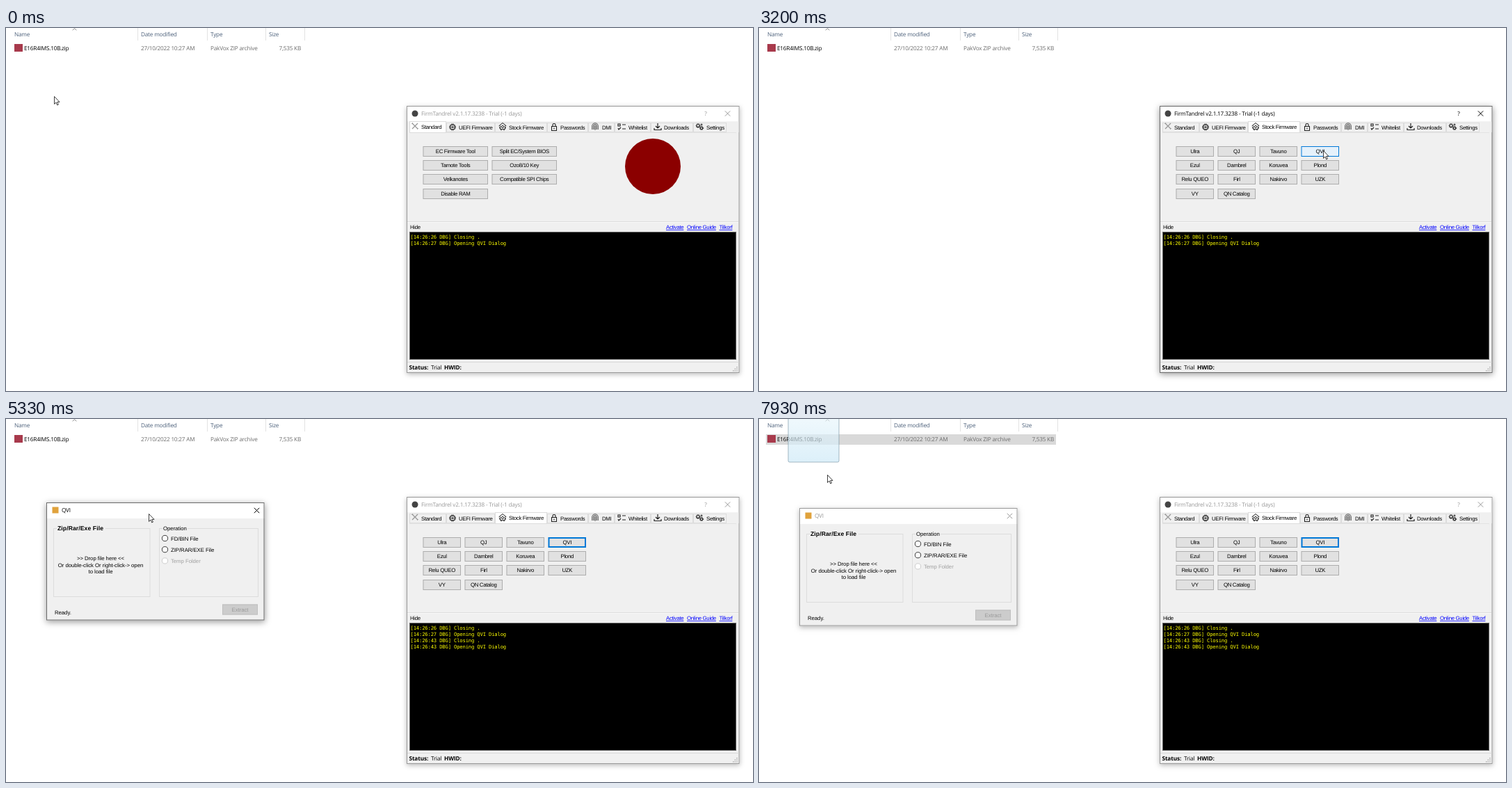
An HTML page with a canvas that plays this animation: 1074 by 522 pixels, repeating every 8000 ms.

```html
<!DOCTYPE html>
<html lang="en">
<head>
<meta charset="utf-8">
<title>Firmware tool demo</title>
<style>
html, body { margin: 0; width: 100%; height: 100%; overflow: hidden; background: #fff; }
canvas { display: block; }
</style>
</head>
<body>
<canvas id="stage" width="1074" height="522"></canvas>
<script>
const ctx = document.getElementById('stage').getContext('2d');
const LOOP = 8000, FPS = 15;

// font, letter spacing
const STYLES = {
  ui: ['8.2px "Open Sans", "Noto Sans", sans-serif', -0.2],
  uiBold: ['bold 8.2px "Open Sans", "Noto Sans", sans-serif', -0.1],
  app: ['7.8px "Liberation Sans", Arial, sans-serif', -0.3],
  dialog: ['7.8px "Liberation Sans", Arial, sans-serif', -0.06],
  dialogBold: ['bold 8.6px "Liberation Sans", Arial, sans-serif', 0.1],
  mono: ['7.2px "DejaVu Sans Mono", "Noto Sans Mono", monospace', -0.16],
};

// y is the vertical middle of the capitals
function text(str, x, y, style = 'app', color = '#000', align = 'left') {
  const [font, spacing] = STYLES[style];
  ctx.font = font;
  ctx.letterSpacing = spacing + 'px';
  ctx.textRendering = 'geometricPrecision';
  ctx.textAlign = align;
  ctx.fillStyle = color;
  ctx.fillText(str, x, y + 2.8);
}

function rect(x, y, w, h, fill, border, line = 1) {
  if (fill) { ctx.fillStyle = fill; ctx.fillRect(x, y, w, h); }
  if (border) {
    ctx.strokeStyle = border;
    ctx.lineWidth = line;
    ctx.strokeRect(x + line / 2, y + line / 2, w - line, h - line);
  }
}

function circle(x, y, r, fill, stroke, line = 1) {
  ctx.beginPath();
  ctx.arc(x, y, r, 0, 7);
  if (fill) { ctx.fillStyle = fill; ctx.fill(); }
  if (stroke) { ctx.strokeStyle = stroke; ctx.lineWidth = line; ctx.stroke(); }
}

function strokePath(d, x, y, color = '#222', line = 1) {
  ctx.save();
  ctx.translate(x, y);
  ctx.strokeStyle = color;
  ctx.lineWidth = line;
  ctx.stroke(new Path2D(d));
  ctx.restore();
}

function windowFrame(x, y, w, h, titleHeight, active) {
  ctx.save();
  ctx.shadowColor = `rgba(0,0,0,${active ? 0.4 : 0.28})`;
  ctx.shadowBlur = active ? 9 : 7;
  ctx.shadowOffsetY = 2;
  rect(x, y, w, h, '#f0f0f0');
  ctx.restore();
  rect(x, y, w, titleHeight, '#fff');
  rect(x, y, w, h, null, active ? '#6b6b6b' : '#9a9a9a');
}

const titleColor = active => active ? '#000' : '#999';
const closeMark = (x, y, active) => strokePath('M-3.7-3.7L3.7 3.7M3.7-3.7L-3.7 3.7', x, y, titleColor(active));

function button(label, x, y, w, fill = '#e1e1e1', border = '#adadad', line = 1) {
  rect(x, y, w, 15, fill, border, line);
  text(label, x + w / 2, y + 7.6, 'app', '#000', 'center');
}

// piecewise linear track of [time, ...values]
function track(keys, t) {
  let i = keys.findIndex(k => k[0] > t);
  if (i < 0) return keys[keys.length - 1].slice(1);
  if (i === 0) return keys[0].slice(1);
  const a = keys[i - 1], b = keys[i], p = (t - a[0]) / (b[0] - a[0]);
  return a.slice(1).map((v, n) => v + (b[n + 1] - v) * p);
}

const POINTER = [
  [400, 69, 98], [600, 170, 84], [870, 530, 92], [1070, 715, 128], [1200, 750, 139],
  [1930, 750, 139], [2200, 812, 168], [2530, 811, 176], [3470, 811, 176],
  [3600, 808, 175], [3870, 808, 175], [4070, 620, 160], [4330, 350, 110],
  [4600, 225, 65], [4870, 204, 45], [5000, 205, 47], [5070, 205, 66],
  [5130, 205, 98], [5200, 205, 118], [5330, 205, 136], [5530, 205, 142],
  [5730, 205, 142], [6000, 125, 82], [6200, 87, 34], [6270, 84, 26],
  [6530, 217, 25], [6670, 224, 25], [7070, 224, 25], [7470, 112, 28],
  [7730, 76, 38], [7870, 80, 62], [7930, 98, 80],
];
const DIALOG = [
  [5000, 55, 29], [5070, 57, 41], [5130, 57, 77], [5200, 57.5, 100],
  [5330, 58, 120], [5400, 58, 125], [5530, 58, 128],
];

function drawExplorer(t) {
  [189, 289, 373, 429].forEach(x => rect(x, 0, 1, 18, '#e3e3e3'));
  [['Name', 12], ['Date modified', 194], ['Type', 294], ['Size', 378]]
    .forEach(([label, x]) => text(label, x, 9, 'ui', '#4c607a'));
  strokePath('M-2.8 2.8L0 0L2.8 2.8', 98.5, 0.5, '#777', 0.8);

  const rowColor = t >= 7400 ? '#d9d9d9' : t >= 7070 ? '#cce8ff' : t >= 6200 ? '#e5f3ff' : null;
  if (rowColor) rect(10, 22, 417, 15, rowColor);
  rect(12, 23, 12, 11, '#a83a4c');
  text('E16R4IMS.10B.zip', 26, 29, 'ui');
  text('27/10/2022 10:27 AM', 194, 29, 'ui', '#6d6d6d');
  text('PakVox ZIP archive', 294, 29, 'ui', '#6d6d6d');
  text('7,535 KB', 424, 29, 'ui', '#6d6d6d', 'right');
}

function gear(x, y, r) {
  circle(x, y, r, null, '#222', 1.2);
  ctx.save();
  ctx.setLineDash([1, 1.2]);
  circle(x, y, r + 1, null, '#222', 1);
  ctx.restore();
}

const ICONS = [
  () => {
    strokePath('M-4-4L4 4M4-4L-4 4', 588, 141, '#999', 1.3);
    strokePath('M-5-3L-3-5M3 5L5 3', 588, 141, '#aaa');
  },
  () => {
    strokePath('M-3-3H3V3H-3ZM-1-5V-3M1-5V-3M-1 3V5M1 3V5M-5-1H-3M-5 1H-3M3-1H5M3 1H5', 642, 142.5, '#222', 1.1);
    rect(640.5, 141.5, 3, 2, '#222');
  },
  () => {
    strokePath('M-5.5-.5L0-5L5.5-.5M-3.5-1V4H3.5V-1M-5 2H-3.5M3.5 2H5M-2 4V6M2 4V6', 714, 141.5, '#222');
    circle(714, 142, 1.6, null, '#222');
  },
  () => {
    strokePath('M-3.5-1H3.5V5H-3.5ZM-2-1V-3.5Q-2-5 0-5Q2-5 2-3.5V-1M0 1V3', 788, 142.5, '#222', 1.1);
  },
  () => {
    [1.2, 2.8, 4.4].forEach(r =>
      strokePath(`M${-r} 4V-1A${r} ${r} 0 0 1 ${r}-1V4`, 847, 142, '#555', 0.9));
    strokePath('M0-1V5', 847, 142, '#555', 0.8);
  },
  () => {
    strokePath('M-5-4H-2V-1H-5ZM-5 2L-4 4L-1 1M1-3H6M1 3H6', 885, 142, '#222', 1.2);
  },
  () => {
    strokePath('M0-5V2M-3-1L0 2L3-1M-5 2V4.5H5V2', 937, 142, '#222', 1.2);
  },
  () => { gear(995, 140.5, 2); gear(1000, 144, 1.7); circle(1000, 139, 1, null, '#222'); },
];
const TABS = [
  ['Standard', 597], ['UEFI Firmware', 651], ['Stock Firmware', 723], ['Passwords', 797],
  ['DMI', 857], ['Whitelist', 895], ['Downloads', 946], ['Settings', 1007],
];
const TAB_EDGES = [580, 633, 703, 778, 837, 875, 927, 988, 1036];
const TOOLS = [
  ['EC Firmware Tool', 'Split EC/System BIOS'], ['Tarnote Tools', 'Ozo8/10 Key'],
  ['Velkanotes', 'Compatible SPI Chips'], ['Disable RAM'],
];
const VENDORS = [
  ['Ulra', 'QJ', 'Tavuno', 'QVI'], ['Ezul', 'Dambrel', 'Koruvea', 'Plond'],
  ['Relu QUEO', 'Firl', 'Nakirvo', 'UZK'], ['VY', 'QN Catalog'],
];
const LINKS = [['Activate', 949], ['Online Guide', 979], ['Tilkorf', 1025.5]];
const LOG = [
  '[14:26:26 DBG] Closing .', '[14:26:27 DBG] Opening QVI Dialog',
  '[14:26:43 DBG] Closing .', '[14:26:43 DBG] Opening QVI Dialog',
];

function drawTabs(t, selected) {
  TABS.forEach(([label, x], i) => {
    const left = TAB_EDGES[i], width = TAB_EDGES[i + 1] - left, current = i === selected;
    if (current) rect(left, 134, width, 17, '#fff', '#dcdcdc');
    else {
      const hovered = i === 2 && t >= 1130;
      rect(left, 136, width, 14, hovered ? '#d8eaf9' : '#f0f0f0', '#dcdcdc');
    }
    ICONS[i]();
    text(label, x, current ? 141.7 : 142.7);
  });
}

function vendorState(t) {
  if (t >= 4000) return ['#e1e1e1', '#0078d7', 2];
  if (t >= 3470 && t < 3600) return ['#cce4f7', '#005499'];
  if (t >= 2330) return ['#e5f1fb', '#0078d7'];
  return [];
}

function drawMain(t) {
  const stock = t >= 1470, active = stock && t < 3730;
  windowFrame(576, 112, 478.5, 384, 22.5, active);
  circle(588, 123, 4.5, '#444');
  text('FirmTandrel v2.1.17.3238 - Trial (-1 days)', 597, 123, 'ui', titleColor(active));
  text('?', 1006, 123, 'ui', titleColor(active), 'center');
  closeMark(1037.5, 123, active);

  rect(577, 134.5, 476.5, 15.5, '#f0f0f0');
  rect(580, 150, 470, 1, '#e3e3e3');
  drawTabs(t, stock ? 2 : 0);
  rect(577, 278, 476, 1, '#dcdcdc');
  rect(577, 279, 476, 1, '#fafafa');

  const grid = stock ? VENDORS : TOOLS, [width, pitch] = stock ? [54.5, 60] : [93.5, 99];
  grid.forEach((row, r) => row.forEach((label, c) => {
    const state = label === 'QVI' ? vendorState(t) : [];
    button(label, 599.5 + c * pitch, Math.floor(170 + r * 20.34), width, ...state);
  }));
  if (!stock) circle(930, 199, 40, '#8b0000');

  text('Hide', 581, 286);
  LINKS.forEach(([label, x]) => {
    text(label, x, 286, 'app', '#00f');
    rect(x, 290, ctx.measureText(label).width, 0.8, '#00f');
  });

  rect(580, 293, 470, 184, '#000', '#646464');
  LOG.slice(0, t >= 3670 ? 4 : 2).forEach((line, i) => text(line, 581.5, 300 + i * 9, 'mono', '#ff0'));

  rect(577, 480, 476.5, 1, '#dadada');
  text('Status:', 579.5, 488.5, 'uiBold');
  text('Trial', 611, 488.5, 'ui');
  text('HWID:', 630, 488.5, 'uiBold');
  for (let r = 0; r < 3; r++)
    for (let c = 2 - r; c < 3; c++) rect(1045 + c * 2.6, 487 + r * 2.6, 1.4, 1.4, '#aaa');
}

function groupBox(x, w, label, style, labelWidth) {
  rect(x, 37, w, 99, null, '#dcdcdc');
  rect(x + 5, 35, labelWidth, 5, '#f0f0f0');
  text(label, x + 6, 37, style);
}

function drawDialog(t) {
  if (t < 3730) return;
  const [x, y] = track(DIALOG, t), active = t >= 3870 && t < 7070;
  const [scale, veil] = track([[3730, 0.96, 0.6], [3800, 0.987, 0.35], [3870, 1, 0]], t);
  const W = 313.5, H = 169.5;
  ctx.save();
  ctx.translate(x + W / 2, y + H / 2);
  ctx.scale(scale, scale);
  ctx.translate(-W / 2, -H / 2);

  windowFrame(0, 0, W, H, 23, active);
  rect(8.5, 6.5, 9, 9, '#e0a23c');
  text('QVI', 22, 11.5, 'ui', titleColor(active || t < 3870));
  closeMark(302.5, 11.5, active || t < 3870);

  groupBox(10, 139.5, 'Zip/Rar/Exe File', 'dialogBold', 70);
  groupBox(162, 143, 'Operation', 'dialog', 36);
  ['>> Drop file here <<', 'Or double-click Or right-click-> open', 'to load file']
    .forEach((line, i) => text(line, 78, 80.5 + i * 9.2, 'dialog', '#000', 'center'));
  ['FD/BIN File', 'ZIP/RAR/EXE File', 'Temp Folder'].forEach((label, i) => {
    const cy = 51.5 + i * 16.2, off = i === 2;
    circle(170.5, cy, 4.1, '#fff', off ? '#ccc' : '#333');
    text(label, 179, cy + 0.3, 'dialog', off ? '#a0a0a0' : '#000');
  });
  text('Ready.', 12, 158.5, 'dialog');
  rect(253, 146.5, 51, 15, '#ccc', '#bfbfbf');
  text('Extract', 278.5, 154, 'dialog', '#9a9a9a', 'center');

  // fade in over the white desktop
  rect(0, 0, W, H, `rgba(255,255,255,${veil})`);
  ctx.restore();
}

function drawDragImage(t, px, py) {
  if (t < 7400) return;
  const x = px - 56, bottom = py - 18, top = bottom - 77;
  const fill = ctx.createLinearGradient(0, top, 0, bottom);
  fill.addColorStop(0, 'rgba(235,247,252,.6)');
  fill.addColorStop(1, 'rgba(205,233,247,.7)');
  ctx.beginPath();
  ctx.roundRect(x, top, 73, 77, 2);
  ctx.fillStyle = fill;
  ctx.fill();
  ctx.strokeStyle = 'rgba(120,150,165,.65)';
  ctx.lineWidth = 1;
  ctx.stroke();
}

const ARROW = new Path2D('M.5 .5V11.4L3 9L4.7 12.9L6.4 12.1L4.7 8.4H8Z');
function drawPointer(x, y) {
  ctx.save();
  ctx.translate(x, y);
  ctx.fillStyle = '#fff';
  ctx.fill(ARROW);
  ctx.strokeStyle = '#000';
  ctx.lineWidth = 0.75;
  ctx.stroke(ARROW);
  ctx.restore();
}

function draw(t) {
  rect(0, 0, 1074, 522, '#fff');
  const [px, py] = track(POINTER, t);
  drawExplorer(t);
  drawMain(t);
  drawDialog(t);
  drawDragImage(t, px, py);
  if (t >= 2930 && t < 3200)
    circle(811.5, 176.5, 54.5 - (t - 2930) * 0.2, null, 'rgba(128,128,128,.7)', 2);
  drawPointer(px, py);
}

const start = performance.now();
function tick() {
  const elapsed = (performance.now() - start) % LOOP;
  const step = Math.floor((elapsed + 4) * FPS / 1000) % (LOOP * FPS / 1000);
  draw(Math.round(step * 100 / FPS) * 10);
  requestAnimationFrame(tick);
}
tick();
</script>
</body>
</html>
```
